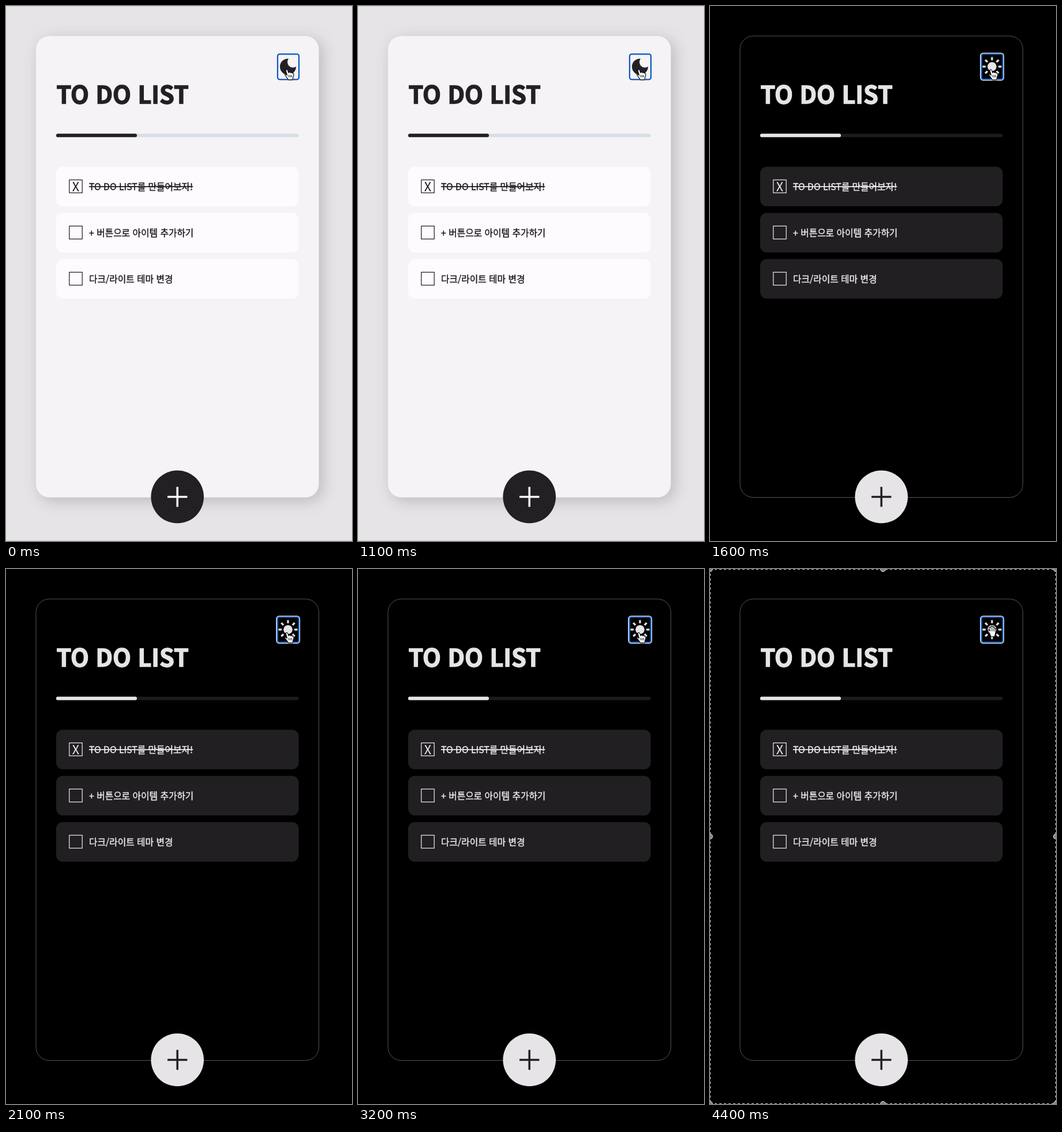
An HTML page that plays this animation: 600 px wide and 927 px high, repeating every 4500 ms.

```html
<!DOCTYPE html>
<html lang="ko">
<head>
<meta charset="utf-8">
<title>To do list</title>
<style>
  html, body { margin: 0; width: 100%; height: 100%; overflow: hidden; }
  svg {
    --bg: #e6e4e7; --edge: #cfcdd1; --card: #f5f3f6; --item: #fdfbfe;
    --ink: #232024; --text: #19171a; --track: #d8dee6; --plus: #fff;
    display: block; width: 100%; height: 100%; background: var(--bg);
    font-family: "Noto Sans CJK KR", "Noto Sans KR", "Noto Sans CJK JP", sans-serif;
  }
  svg.dark {
    --bg: #000; --edge: #000; --card: #000; --item: #211f22;
    --ink: #e6e4e7; --text: #f0eef1; --track: #1b1a1c; --plus: #232024;
  }
  .edge { stroke: var(--edge); }
  .card { fill: var(--card); filter: drop-shadow(6px 6px 13px rgba(40, 35, 45, .22)); }
  .dark .card { filter: none; stroke: #565457; }
  /* thin outlines give the in-between font weights */
  .title { font-size: 41.4px; font-weight: 700; fill: var(--ink); stroke: var(--ink); stroke-width: 1.3; }
  .label { font-size: 15.75px; fill: var(--text); stroke: var(--text); stroke-width: .35; }
  .done { text-decoration: line-through; }
  .mark { font-size: 21.5px; text-anchor: middle; fill: var(--text); }
  .track { fill: var(--track); }
  .ink { fill: var(--ink); }
  .item { fill: var(--item); }
  .box { fill: none; stroke: var(--text); stroke-width: 1.2; }
  .plus { stroke: var(--plus); stroke-width: 3.5; }
  .sun { stroke: var(--ink); stroke-width: 3.2; }
  .hand { fill: #fff; stroke: #111; stroke-width: 1.2; stroke-linejoin: round; }
  .night, .dark .day, #selection, .selected .point { display: none; }
  .dark .night, .selected #selection { display: inline; }
</style>
</head>
<body>
<svg id="stage" viewBox="0 0 600 927" preserveAspectRatio="none">
  <path class="edge" d="M0 .5H600M0 926.5H600"/>
  <rect class="card" x="52" y="52" width="490.5" height="799.5" rx="23"/>
  <text class="title" x="87.4" y="169.3">TO DO LIST</text>
  <rect class="track" x="87" y="221.2" width="420.5" height="6" rx="2.8"/>
  <rect class="ink" x="87" y="221.2" width="140" height="6" rx="2.8"/>
  <g id="items"></g>
  <circle class="ink" cx="297.2" cy="850.5" r="45.8"/>
  <path class="plus" d="M280 850.5h34.4M297.2 833.3v34.4"/>

  <g class="day">
    <rect x="471" y="83.3" width="37" height="44" rx="3.5" fill="none" stroke="#0757c2" stroke-width="2.2"/>
    <path class="ink" d="M490 91.2A14 14 0 1 0 503 105A9.6 9.6 0 0 1 490 91.2Z"/>
  </g>
  <g class="night">
    <rect x="469.2" y="81.8" width="40" height="46.7" rx="4.5" fill="none" stroke="#fff" stroke-width="1.6"/>
    <rect x="471" y="83.5" width="36.5" height="43.3" rx="3" fill="none" stroke="#0a5bcb" stroke-width="2.2"/>
    <circle class="ink" cx="489" cy="105" r="7.8"/>
    <g class="sun" id="rays"></g>
  </g>

  <g class="hand point">
    <path d="M485.3 112.2q-.5-2 1.3-2.2q1.5 0 2 1.6l1.5 4.2q.5-1.6 2-1.2q1.2.2 1.3 1.2q.7-1 1.9-.6q1 .3 1 1.3q2.3-.7 2.7 1.3q.2 2.7-1 5.4q-.8 2-1 4.6h-7.5q-1.4-2.8-4.2-6q-2.3-2.6-1.4-3.4q1.3-1 3.6 1.6Z"/>
    <path d="M490.6 119.5v4M493 119.5v4M495.3 119.5v4" stroke-width="1"/>
  </g>

  <g id="selection">
    <path class="hand" d="M484.3 110.5l-2.5-3.2q-.8-1.8 1-2q1.2 0 2.7 2l-1.4-5q0-1.8 1.4-1.8q1.2 0 1.7 1.8l.4-2.4q.7-1.6 2.2-.9l.8 2.2q.8-1.7 2.2-.8l.8 3q1-1.2 2 0q.7 4.6-.9 8.8l-1 4.8h-6.8q-.7-3.7-2.6-6.5Z"/>
    <path d="M488 103v5M490.7 102v6M493.2 103.5v5" stroke="#111" stroke-width=".9"/>
    <path d="M0 .5H600M0 926.5H600M.5 0V927M599.5 0V927" stroke="#ddd" stroke-dasharray="4 4"/>
    <g id="handles" fill="#858585" stroke="#e4e4e4"></g>
  </g>
</svg>
<script>
  const stage = document.getElementById('stage');
  const fill = (id, parts) => { document.getElementById(id).innerHTML = parts.join(''); };

  const todos = ['TO DO LIST를 만들어보자!', '+ 버튼으로 아이템 추가하기', '다크/라이트 테마 변경'];
  fill('items', todos.map((text, i) => `
    <g transform="translate(87 ${278.5 + 80 * i})">
      <rect class="item" width="420.5" height="68.5" rx="11.4"/>
      <rect class="box" x="22.8" y="22.8" width="22.4" height="22.4"/>
      ${i ? '' : '<text class="mark" x="34" y="42.3">X</text>'}
      <text class="label ${i ? '' : 'done'}" x="57" y="40.5">${text}</text>
    </g>`));

  fill('rays', Array.from({ length: 8 }, (_, i) =>
    `<path d="M489 94v-5.5" transform="rotate(${i * 45} 489 105)"/>`));

  const handles = [];
  for (const x of [0, 300, 600])
    for (const y of [0, 463.5, 927])
      if (x !== 300 || y !== 463.5) handles.push(`<circle cx="${x}" cy="${y}" r="4.5"/>`);
  fill('handles', handles);

  function draw() {
    const t = performance.now() % 4500;
    stage.classList.toggle('dark', t >= 1600);
    stage.classList.toggle('selected', t >= 4300);
    requestAnimationFrame(draw);
  }
  draw();
</script>
</body>
</html>
```
